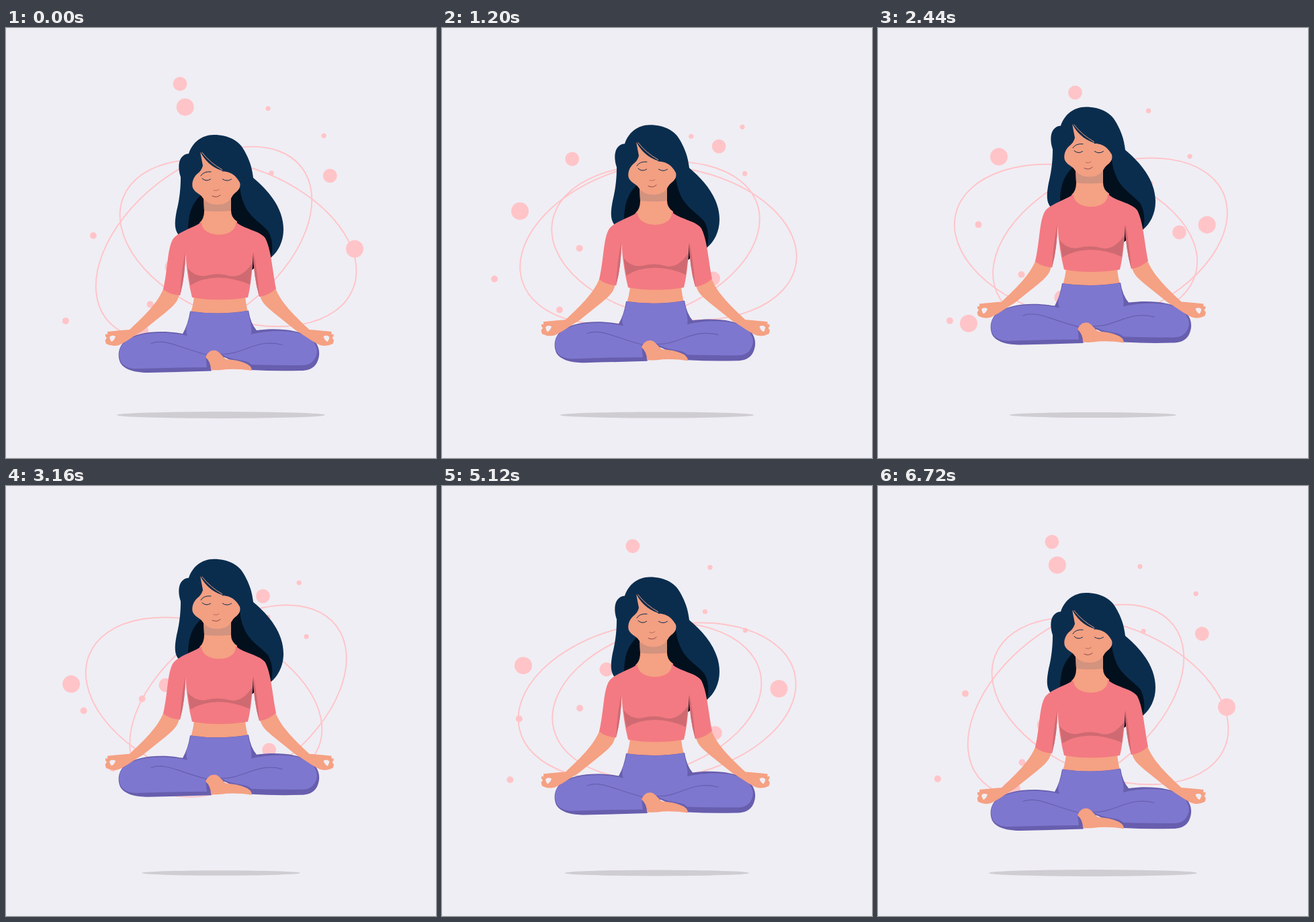
An HTML page for the animation above (6.76 s loop, 640x640 px).

```html
<!DOCTYPE html>
<html lang="en">
<head>
<meta charset="utf-8">
<title>Floating meditation</title>
<style>
html, body { margin: 0; width: 100%; height: 100%; overflow: hidden; background: #efeef4; }
svg { display: block; width: 100%; height: 100%; }
.orbit { fill: none; stroke: #ffc4c8; stroke-width: 1.9; }
.dot { fill: #ffc4c8; }
.skin { fill: #f5a183; }
.face { fill: #f29f82; }
.navy { fill: #0a2d4e; }
.night { fill: #02101d; }
.shirt { fill: #f37a82; }
.fold { fill: #cf6a72; }
.pants { fill: #7e77cf; }
.dusk { fill: #675eae; }
.line { fill: none; stroke: #0a2d4e; stroke-linecap: round; }
.soft { stroke: #b9705f; }
.crease { fill: none; stroke: #675eae; stroke-width: 1.2; stroke-linecap: round; }
</style>
</head>
<body>
<svg viewBox="0 0 640 640">
  <ellipse id="shadow" cx="320" cy="576" fill="#cfcdd2"/>
  <ellipse class="orbit" rx="184" ry="112"/>
  <ellipse class="orbit" rx="184" ry="112"/>
  <g id="dots" class="dot"></g>

  <g id="woman">
    <!-- hair behind -->
    <path class="navy" d="M309 159C333 159 348 169 355 183C362 196 366 206 368 223C392 243 413 269 413 300C413 318 405 333 394 342L300 318L262 306L257 308C250 300 251 288 254 272C259 252 260 236 260 222C254 204 258 188 272 187C277 171 291 159 309 159Z"/>
    <path class="night" d="M293 246C279 258 271 272 271 302L300 320L364 300L366 360L369 358L376 330L394 342C398 330 397 314 390 302C377 288 361 280 354 261Q349 250 348 236Z"/>

    <!-- neck and face -->
    <path class="skin" d="M294 246H335V272Q335 282 344 288L344 312H288V290Q295 284 295 272Z"/>
    <path fill="#d2937f" d="M294 252H335V272Q315 274 295 272Z"/>
    <path class="face" d="M289 184L293 205Q291 212 286 216C278 222 276 232 278 238C282 246 290 247 293 253C298 260 306 263 315 263C326 263 333 258 337 250C340 245 346 243 348 237C350 228 346 221 340 216L324 206Z"/>
    <path class="navy" d="M290 186Q303 209 328 214Q341 216 349 232L356 226L350 190L310 172L284 178Z"/>
    <path fill="none" stroke="#f29f82" d="M291.500 185Q304 201 322 211"/>
    <path class="line" d="M290 220Q294 213 305 214M322 213Q328 212 337 215M292 224Q298 229.500 304.500 225M322.500 225Q329 229.500 335.500 225"/>
    <path class="line soft" d="M309 241.500Q313 243.500 317 240.500"/>
    <path class="line" style="stroke:#8f4a48" d="M307 250Q314 253.500 319 248.500"/>

    <!-- legs -->
    <path class="skin" d="M280 398H356Q357 413 361 426H274Q279 413 280 398Z"/>
    <path class="dusk" d="M274 421.500Q318 428 361 420.500Q364 440 373 450C403 446 436 449 452 460C463 467 467 477 466 487C464 503 455 510 438 510Q400 511 366 509L325 490L305 510.500Q256 512 212 513C193 513 176 509 170 498C165 486 168 473 178 465C196 452 230 449 263 455Q271 441 274 421.500Z"/>
    <path class="pants" d="M275 422Q318 428 360 421C363 436 367 446 365 456C395 448.500 438 448.500 454 463C463 472 466 483 459 493Q454 502 440 502Q400 502 365 501C359 494 345 495 333 491Q324 488 317 484L297 488L299 505Q250 505 198 507Q178 508 171 497C165 483 170 472 180 465C200 452 238 451 270 458Q267 453 269 443Q273 434 275 422Z"/>
    <path class="crease" d="M216 469.500C237 461 259 477 302 487M318 485C352 488 372 461 411 471.500"/>
    <path class="skin" d="M297 490C300 482 306 479 312 480C319 482 322 490 328 493Q345 494 354 498Q366 502 366 510Q348 507 328 508Q316 510 305 509Q305 497 297 490Z"/>

    <!-- arms -->
    <g id="arm">
      <path class="skin" fill-rule="evenodd" d="M235 386C227 409 203 431 184 449Q170 450 151 452L151 456L148 455.500V459L150 461L147.500 465L149 470Q159 475 168 472C178 468 190 458 203 451L238 423C251 412 257 406 258 394ZM154 460L157 458Q160 457.500 163 459Q162 464 157 467Q155 465 154 460Z"/>
    </g>
    <use href="#arm" transform="matrix(-1 0 0 1 635.5 0)"/>

    <!-- shirt -->
    <path class="shirt" d="M291 289C280 297 254 304 248 315C240 330 241 358 234 389Q244 397 259 398Q267 368 267 335Q270 374 277 401Q317 408 360 401Q366 376 368 335Q368 368 377 400Q391 398 402 388C397 365 395 330 386 313C378 301 351 299 342 288C343 301 331 307.500 317 307.500C303 307.500 291 301 291 289Z"/>
    <path class="fold" d="M267 333Q261 360 259 398Q267 368 267 333ZM368 333Q374 360 377 400Q368 368 368 333ZM270 357Q282 372 299 368.500Q317 364 333 369Q351 373 366.500 350L363 382Q341 372 316 371.500Q291 372 274.500 383Z"/>
  </g>
</svg>
<script>
const LOOP = 6760, TURN = 6720;

// The closed track every dot follows: time, x, y
const track = [
  [0, -29, -57.2], [640, 0, -42], [840, 9.2, -36.2], [1000, 17.1, -33],
  [1780, 53.8, -17.5], [2280, 51.3, 7.7], [2440, 45.1, 14], [3160, 28.1, 47.1],
  [3560, 17.9, 65], [3600, 16, 65.8], [4440, -20.5, 45], [4560, -24, 39],
  [4960, -29.2, 18.5], [5200, -27.3, 6], [5760, -48.1, -15.7],
  [6240, -48.4, -40.7], [6320, -46.4, -44.6]
];
const delays = [0, 1800, 4560];

// Each ring is the track turned and scaled by (a, b), mirrored when flip is -1
const rings = [
  { r: 3.6, x: 419, y: 177, a: 1, b: 0, flip: 1 },
  { r: 10.4, x: 325.2, y: 252.3, a: 2.82, b: .27, flip: 1 },
  { r: 5, x: 148.1, y: 369.7, a: 1.338, b: .358, flip: -1 },
  { r: 13, x: 291, y: 317.7, a: -1.451, b: -3.25, flip: -1 }
];

const $ = id => document.getElementById(id);
const orbits = document.querySelectorAll('.orbit');
const dots = rings.flatMap(ring => delays.map(delay => {
  const el = document.createElementNS('http://www.w3.org/2000/svg', 'circle');
  el.setAttribute('r', ring.r);
  $('dots').append(el);
  return { el, ring, delay };
}));

function key(i) {
  const n = track.length, [t, x, y] = track[(i + n) % n];
  return [t + TURN * Math.floor(i / n), x, y];
}

// Velocity at q, weighting the nearer neighbour more
function slope(p, q, r, c) {
  const h = q[0] - p[0], k = r[0] - q[0];
  return ((q[c] - p[c]) / h * k + (r[c] - q[c]) / k * h) / (h + k);
}

// Smooth closed curve through the track points
function trackAt(time) {
  const t = time % TURN;
  const i = track.findLastIndex(k => k[0] <= t);
  const [p, q, r, s] = [key(i - 1), key(i), key(i + 1), key(i + 2)];
  const h = r[0] - q[0], u = (t - q[0]) / h, v = 1 - u;
  return [1, 2].map(c => {
    const m = h * slope(p, q, r, c), n = h * slope(q, r, s, c);
    return q[c] * v * v * (1 + 2 * u) + r[c] * u * u * (3 - 2 * u) + m * u * v * v - n * u * u * v;
  });
}

const wave = t => Math.cos(2 * Math.PI * t / TURN);

function tilt(el, x, angle) {
  el.setAttribute('transform', `translate(${x} 320) rotate(${angle})`);
}

function draw() {
  const t = Math.min(performance.now() % LOOP, TURN);
  const x = 1 - Math.abs(1 - 2 * t / TURN);
  const lift = x * x * (3 - 2 * x);

  $('woman').setAttribute('transform', `translate(0 ${-50.7 * lift})`);
  $('shadow').setAttribute('rx', 155 - 37.5 * lift);
  $('shadow').setAttribute('ry', 4.9 - 1.1 * lift);
  tilt(orbits[0], 345.5, -8.7 + 31 * wave(t - 220));
  tilt(orbits[1], 294.5, -8 - 30 * wave(t + 110));

  for (const { el, ring, delay } of dots) {
    const [px, py] = trackAt(t + delay), fy = py * ring.flip;
    el.setAttribute('cx', ring.x + ring.a * px - ring.b * fy);
    el.setAttribute('cy', ring.y + ring.b * px + ring.a * fy);
  }
  requestAnimationFrame(draw);
}
draw();
</script>
</body>
</html>
```
